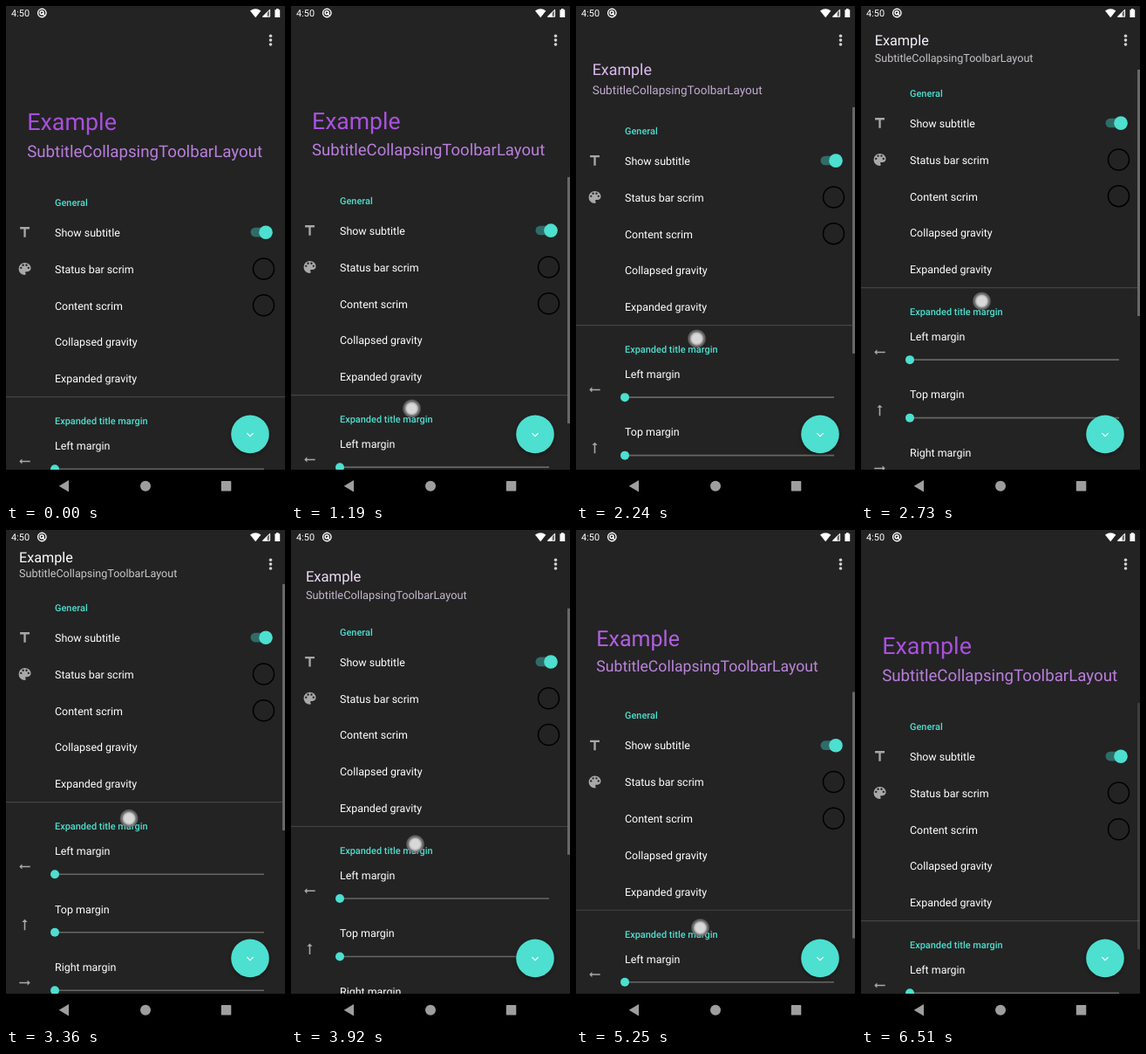
Animation of 320x568 px, one loop 6.58 s. Source, as an HTML page:

```html
<!DOCTYPE html>
<html lang="en">
<head>
<meta charset="utf-8">
<title>Collapsing toolbar</title>
<style>
  html, body { margin: 0; width: 100%; height: 100%; overflow: hidden; background: #232323; }
  svg { display: block; width: 320px; height: 568px; }
  text { font-family: Roboto, sans-serif; text-rendering: geometricPrecision; }
  .row { font-size: 12.45px; fill: #fff; }
  .head { font-size: 10.95px; font-weight: 500; fill: #4ddfd0; }
  .accent { fill: #4ddfd0; }
  .icon { fill: #a8a8a8; }
  .ring { fill: none; stroke: #000; stroke-width: 1.5; }
</style>
</head>
<body>
<svg viewBox="0 0 320 568">
  <defs>
    <radialGradient id="touchFill">
      <stop offset=".45" stop-color="#d8d8d8"/>
      <stop offset=".62" stop-color="#b4b4b4"/>
      <stop offset=".72" stop-color="#808080" stop-opacity=".9"/>
      <stop offset=".88" stop-color="#707070" stop-opacity=".75"/>
      <stop offset="1" stop-color="#555" stop-opacity="0"/>
    </radialGradient>
    <filter id="soft" x="-30%" y="-30%" width="160%" height="160%"><feGaussianBlur stdDeviation="2"/></filter>
    <path id="arrow" d="M16 11H4v2h12v3l4-4-4-4z" transform="scale(.778) translate(-12 -12)"/>
  </defs>
  <rect width="320" height="568" fill="#232323"/>

  <text id="title">Example</text>
  <text id="subtitle">SubtitleCollapsingToolbarLayout</text>

  <g id="list">
    <text class="head" x="56" y="228.9">General</text>
    <path class="icon" transform="translate(12.2 250) scale(.778)" d="M5 4v3h5.5v12h3V7H19V4z"/>
    <path class="icon" fill-rule="evenodd" transform="translate(12.2 291.7) scale(.778)" d="M12 3a9 9 0 0 0 0 18c.83 0 1.5-.67 1.5-1.5 0-.39-.15-.74-.39-1.01-.23-.26-.38-.61-.38-.99 0-.83.67-1.5 1.5-1.5H16c2.76 0 5-2.24 5-5 0-4.42-4.03-8-9-8zM6.5 12a1.5 1.5 0 1 1 0-3 1.5 1.5 0 0 1 0 3zm3-4a1.5 1.5 0 1 1 0-3 1.5 1.5 0 0 1 0 3zm5 0a1.5 1.5 0 1 1 0-3 1.5 1.5 0 0 1 0 3zm3 4a1.5 1.5 0 1 1 0-3 1.5 1.5 0 0 1 0 3z"/>
    <rect x="280.5" y="253.8" width="23" height="10.6" rx="5.3" fill="#2f6c67"/>
    <circle class="accent" cx="298" cy="259.2" r="7.8"/>
    <circle class="ring" cx="295.5" cy="301" r="12"/>
    <circle class="ring" cx="295.5" cy="342.7" r="12"/>
    <path d="M0 447.7H320" stroke="#434343" stroke-width="1.2"/>
    <text class="head" x="56" y="479.1">Expanded title margin</text>
  </g>

  <rect id="bar" x="317" width="3" height="282" fill="#686868"/>

  <circle cx="280" cy="492" r="21.8" fill="#000" opacity=".4" filter="url(#soft)"/>
  <circle class="accent" cx="280" cy="490.4" r="21.8"/>
  <path d="M276.4 489.1l3.6 3.6 3.6-3.6" fill="none" stroke="#fff" stroke-width="1.3"/>

  <circle id="touch" r="11" fill="url(#touchFill)"/>

  <g fill="#fff">
    <text x="6" y="12" font-size="10.9">4:50</text>
    <g fill="none" stroke="#fff" stroke-width="1.4">
      <circle cx="41.3" cy="8" r="4.7"/>
      <circle cx="41.1" cy="7.8" r="2"/>
      <path d="M41.5 8.2l3.2 3.2"/>
    </g>
    <path d="M280 5.6q6.2-4.6 12.4 0L286.2 13.2z"/>
    <path d="M303 3.2V12.6H293.6z" fill-opacity=".35"/>
    <path d="M302.6 4.2V12.2H294.6z" fill="none" stroke="#fff"/>
    <path d="M299.5 7V12.6H294z"/>
    <path d="M308.4 4.2h1.6V3h2.6v1.2h1.6v8.9h-5.8z"/>
  </g>
  <g fill="#d0d0d0">
    <circle cx="303.5" cy="34.2" r="1.8"/>
    <circle cx="303.5" cy="39.1" r="1.8"/>
    <circle cx="303.5" cy="44" r="1.8"/>
  </g>

  <rect y="531" width="320" height="37" fill="#000"/>
  <g fill="#9e9e9e">
    <path d="M60.7 549.8l11.3-6.7v13.4z"/>
    <circle cx="160" cy="549.8" r="6"/>
    <rect x="246.8" y="544.1" width="11.5" height="11.5" rx=".8"/>
  </g>
</svg>
<script>
const LOOP = 6580, RANGE = 136;
const $ = id => document.getElementById(id);
const list = $('list'), bar = $('bar'), touch = $('touch');
const clamp = v => Math.min(1, Math.max(0, v));
const mix = (a, b, k) => a + (b - a) * k;

const rows = ['Show subtitle', 'Status bar scrim', 'Content scrim', 'Collapsed gravity', 'Expanded gravity'];
const margins = [['Left', 180], ['Top', -90], ['Right', 0]];
const label = (text, y) => `<text class="row" x="56" y="${y}">${text}</text>`;

list.insertAdjacentHTML('beforeend',
  rows.map((name, i) => label(name, 263.9 + i * 41.85)).join('') +
  margins.map(([side, turn], i) => {
    const y = 530.2 + i * 66.5;
    return label(side + ' margin', y - 22.2) +
      `<use href="#arrow" class="icon" transform="translate(21.5 ${y - 8.7}) rotate(${turn})"/>
       <path d="M56 ${y}H296" stroke="#666" stroke-width="1.6"/>
       <circle class="accent" cx="56" cy="${y}" r="5"/>`;
  }).join(''));

// Finger drag: time, scroll offset
const drag = [
  [1120, 0], [1260, 4], [1750, 47], [2100, 72], [2450, 97], [2730, 125], [2900, 136],
  [3600, 136], [3850, 116.5], [3920, 108.3], [4550, 55], [4760, 45], [5250, 12.5], [5460, 2], [5600, 0]
];

function scrollAt(t) {
  const i = drag.findIndex(p => p[0] > t);
  if (i < 1) return 0;
  const [t0, s0] = drag[i - 1], [t1, s1] = drag[i];
  return mix(s0, s1, (t - t0) / (t1 - t0));
}

function place(id, k, x, y, sizes, from, to) {
  const el = $(id), shrink = 1 - (1 - k) ** 2;
  el.setAttribute('x', x);
  el.setAttribute('y', y);
  el.setAttribute('font-size', mix(...sizes, shrink));
  el.setAttribute('fill', `rgb(${from.map((c, i) => Math.round(mix(c, to[i], k)))})`);
}

function draw(now) {
  const t = now % LOOP, s = scrollAt(t), k = s / RANGE;
  const x = mix(24.2, 15, k);
  place('title', k, x, 142.4 - s * .775, [26.9, 16.2], [168, 80, 220], [255, 255, 255]);
  place('subtitle', k, x, 173.2 - s * .875, [18.72, 12.57], [186, 126, 222], [200, 200, 200]);
  list.setAttribute('transform', `translate(0 ${-s})`);

  bar.setAttribute('y', 198 - s);
  bar.setAttribute('opacity', t < 1190 ? 0 : clamp((6650 - t) / 350));

  const back = clamp((t - 2900) / 700);
  touch.setAttribute('cx', mix(138.5, 142.5, back));
  touch.setAttribute('cy', mix(463, 468, back) - s);
  touch.setAttribute('opacity', t >= 1120 && t < 5740 ? 1 : 0);
}

const start = performance.now();
(function frame() {
  draw(performance.now() - start);
  requestAnimationFrame(frame);
})();
</script>
</body>
</html>
```
